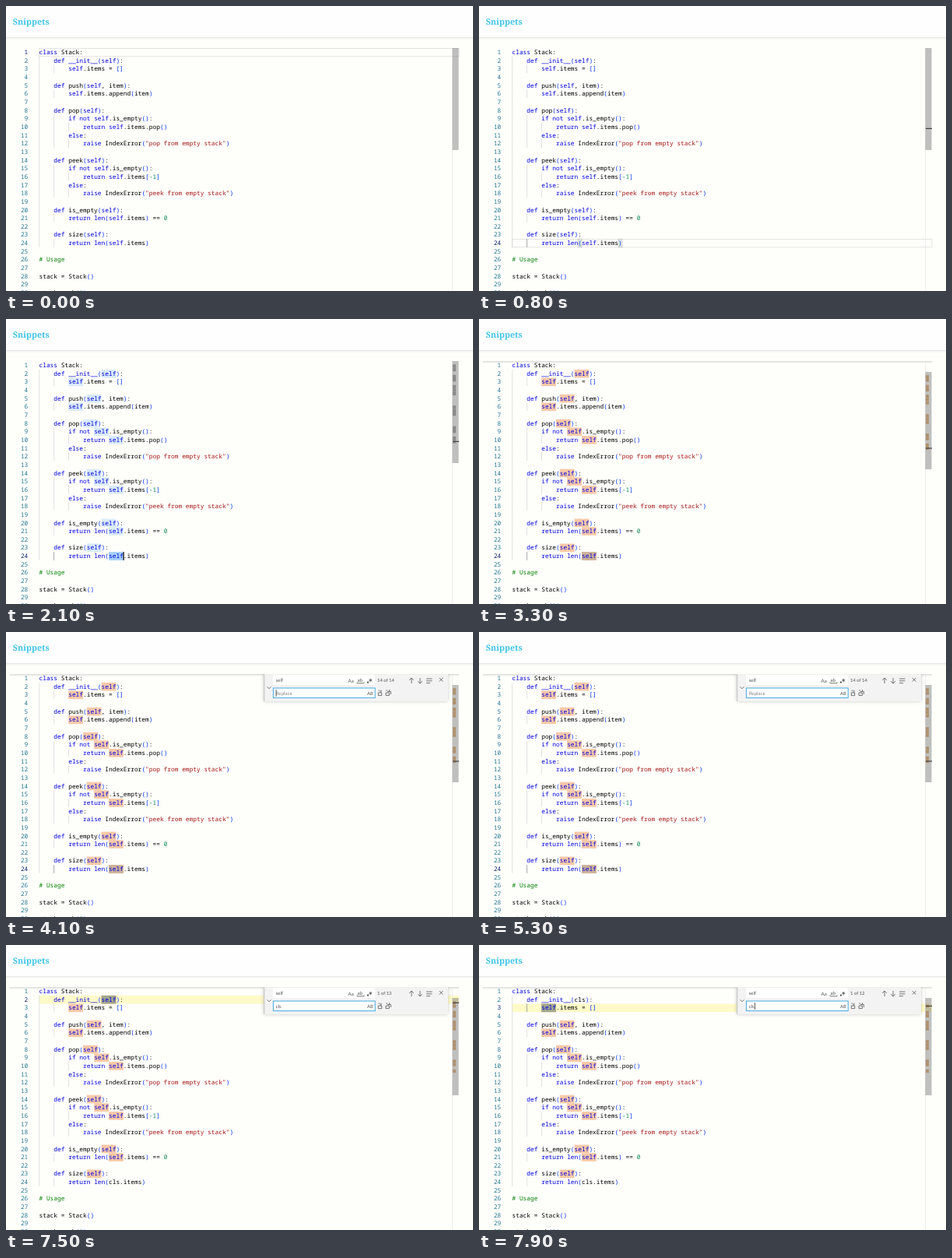
These frames come from a looping animation (600 px wide and 366 px high, 8 s). An HTML page:

```html
<!DOCTYPE html>
<html lang="en">
<head>
<meta charset="utf-8">
<title>Snippets</title>
<style>
  html, body { margin: 0; width: 100%; height: 100%; overflow: hidden; background: #fefefb; }
  svg { display: block; width: 600px; height: 366px; }
  text { white-space: pre; text-rendering: geometricPrecision; }
  .code { font: 7.85px "Noto Sans Mono", monospace; }
  .ui { font: 6.2px Lato, sans-serif; fill: #555; }
  .title { font: bold 10.8px "Noto Serif", serif; fill: #40c4e8; }
  .icon { fill: none; stroke: #555; stroke-width: .8; }
</style>
</head>
<body>
<svg id="stage" viewBox="0 0 600 366"></svg>
<script>
const LOOP = 8000;
const LEFT = 42.5, RIGHT = 582, TOP = 54.2, CW = 4.71, LH = 10.65;
const stage = document.getElementById('stage');

const CODE = `class Stack:
    def __init__(self):
        self.items = []

    def push(self, item):
        self.items.append(item)

    def pop(self):
        if not self.is_empty():
            return self.items.pop()
        else:
            raise IndexError("pop from empty stack")

    def peek(self):
        if not self.is_empty():
            return self.items[-1]
        else:
            raise IndexError("peek from empty stack")

    def is_empty(self):
        return len(self.items) == 0

    def size(self):
        return len(self.items)

# Usage

stack = Stack()

stack.push(1)`.split('\n');

const TOKEN = /(#.*)|("[^"]*")|(\b(?:class|def|if|not|return|else|raise|self|len|__init__)\b)|(-?\b\d+)|([()[\]])|[\w.:,]+|=+/g;
const COLORS = ['#008000', '#a31515', '#0000e0', '#098658', '#0431fa'];

const colX = c => LEFT + c * CW;
const lineY = n => TOP + (n - 1) * LH;
const rect = (x, y, w, h, fill, extra = '') =>
  `<rect x="${x}" y="${y}" width="${w}" height="${h}" fill="${fill}" ${extra}/>`;
const text = (x, y, s, cls, extra = '') =>
  `<text x="${x}" y="${y}" class="${cls}" ${extra}>${s}</text>`;
const icon = (d, extra = '') => `<path class="icon" d="${d}" ${extra}/>`;
const cells = (n, col, len, fill, extra) => rect(colX(col), lineY(n), len * CW, LH, fill, extra);

function stateAt(t) {
  const s = { t, find: t >= 3300, done: [], line: t < 100 ? 1 : 24, caret: null, word: null };
  if (t >= 7000) { s.done.push(24); s.line = 2; }
  if (t >= 7900) { s.done.push(2); s.line = 3; }
  s.selected = t >= 1800;
  s.border = !s.selected;
  s.brackets = t >= 300 && t < 1800;
  if (t >= 200 && t < 800) s.caret = 30;
  else if (t >= 1100 && t < 1500) s.caret = 29;
  else if (t >= 1800 && t < 2400 || t >= 2900 && t < 3300) s.caret = 23;
  if (t >= 1300 && t < 1800) s.word = 'items';
  else if (t >= 2000) s.word = 'self';
  s.lines = CODE.map((l, i) => s.done.includes(i + 1) ? l.replace('self', 'cls') : l);
  return s;
}

function highlights(s) {
  let out = '';
  if (s.border) out += rect(LEFT, lineY(s.line) + .3, RIGHT - LEFT, LH - .4, 'none', 'stroke="#e2e2e0" stroke-width=".9"');
  if (s.done.length) out += rect(LEFT, lineY(s.line), RIGHT - LEFT, LH, '#fffac8');
  if (s.brackets) {
    for (const c of [18, 29]) out += cells(24, c, 1, '#e5efe3', 'stroke="#b9b9b9" stroke-width=".7"');
  }
  if (s.word) {
    const re = new RegExp(`\\b${s.word}\\b`);
    const fill = s.find ? '#f8c9a8' : s.word === 'items' ? '#d2d2cf' : '#d9ebfa';
    s.lines.forEach((l, i) => {
      const col = l.search(re);
      if (col >= 0) out += cells(i + 1, col, s.word.length, fill);
    });
  }
  if (s.selected) {
    const fill = !s.find ? '#a5d0fa' : s.done.length ? '#a3a68c' : '#cbb198';
    out += cells(s.line, s.lines[s.line - 1].indexOf('self'), 4, fill);
  }
  return out;
}

function guides(s) {
  let out = '';
  for (let n = 2; n <= 24; n++) {
    const l = s.lines[n - 1];
    const depth = l ? l.search(/\S/) / 4 : 1;
    for (let k = 0; k < depth; k++) {
      const active = n === s.line && k === 1;
      out += rect(colX(k * 4), lineY(n), .75, LH, active ? '#8c8c8c' : '#d6d6d6');
    }
  }
  return out;
}

function source(s) {
  return s.lines.map((l, i) => {
    const y = (lineY(i + 1) + 7.95).toFixed(2);
    const num = text(28.3, y, i + 1, 'code', `text-anchor="end" fill="${i + 1 === s.line ? '#0b216f' : '#237893'}"`);
    const spans = [...l.matchAll(TOKEN)].map(m => {
      const kind = m.slice(1).findIndex(Boolean);
      return `<tspan x="${colX(m.index).toFixed(2)}" fill="${COLORS[kind] || '#000'}">${m[0]}</tspan>`;
    });
    return num + text(LEFT, y, spans.join(''), 'code');
  }).join('');
}

function ruler(s) {
  const top = s.find ? 68 : 54, step = s.find ? 4.17 : 4.4;
  let out = rect(573, 54, .7, 312, '#e6e6e4');
  if (s.word) {
    const re = new RegExp(`\\b${s.word}\\b`);
    s.lines.forEach((l, i) => {
      if (re.test(l)) out += rect(574, top + i * step, 4, step, s.find ? '#e4b078' : '#a5a5a5');
    });
  }
  out += rect(573.5, top, 8, s.find ? 125 : 131, '#646464', 'fill-opacity=".41"');
  if (s.line > 1) out += rect(574, top + (s.line - .5) * step - .6, 8, 1.2, '#444');
  return out;
}

function inputText(t) {
  const typed = t < 6500 ? '' : 'cls'.slice(0, t < 6600 ? 1 : t < 6700 ? 2 : 3);
  const blink = t < 6500 ? t >= 4100 && (t - 4100) % 800 < 400 : t < 7500 || t >= 7900;
  const x = 346.7 + [0, 3, 4.6, 7.3][typed.length];
  return (typed ? text(346.7, 80.6, typed, 'ui') : text(346.7, 80.6, 'Replace', 'ui', 'style="fill:#858585"'))
    + (blink ? rect(x, 74, .7, 9, '#222') : '');
}

function findBox(s) {
  const p = Math.min(1, (s.t - 3300) / 230);
  const count = ['14 of 14', '1 of 13', '1 of 12'][s.done.length];
  return `<g clip-path="url(#pane)"><g transform="translate(0 ${(-40 * (1 - p)).toFixed(2)})">`
    + rect(331, 50, 237, 39, '#f3f3f3', 'rx="2" filter="url(#soft)"')
    + rect(331, 54, 1.4, 35, '#cdcdcd')
    + rect(343, 55, 131, 13, '#fff')
    + text(346.7, 63.6, 'self', 'ui')
    + text(439.5, 64.5, 'Aa', 'ui')
    + text(451.5, 64, 'ab', 'ui') + icon('M451 64.5v1.3h9v-1.3')
    + rect(464, 63.6, 1.9, 1.9, '#444')
    + icon('M468.3 59.8v4.4M466.4 60.9l3.8 2.2M470.2 60.9l-3.8 2.2')
    + text(477, 64.2, count, 'ui', 'style="font-size:5.9px"')
    + icon('M521 66v-7M518.2 61.8l2.8-2.8 2.8 2.8')
    + icon('M532 59v7M529.2 63.2l2.8 2.8 2.8-2.8')
    + icon('M540 60h7.5M540 62.8h7.5M540 65.6h5')
    + icon('M556.8 59l4.6 4.6M561.4 59l-4.6 4.6')
    + icon('M335.5 70.3l2.5 2.5 2.5-2.5')
    + rect(343.4, 72, 130.8, 12.6, '#fff', 'stroke="#45a9e0" stroke-width="1"')
    + inputText(s.t)
    + text(464, 80.5, 'AB', 'ui', 'style="font-size:5.8px"')
    + icon('M478.3 78v3.6h4.4v-3.6zM478.5 75.2h2M482 74.5v2.6h-1.6', 'stroke-width="1"')
    + icon('M488 78v3.4h4.4v-3.4zM490 76.5h4.4v3.4M488.2 75h2M492.5 74.2v2')
    + '</g></g>';
}

const DEFS = `<defs>
  <clipPath id="pane"><rect x="0" y="54.2" width="600" height="312"/></clipPath>
  <filter id="soft" x="-5%" y="-20%" width="110%" height="150%">
    <feDropShadow dx="0" dy="0" stdDeviation="2" flood-color="#000" flood-opacity=".22"/>
  </filter>
  <linearGradient id="fade" x2="0" y2="1">
    <stop stop-color="#d9d9d9"/><stop offset="1" stop-color="#d9d9d9" stop-opacity="0"/>
  </linearGradient>
</defs>`;

const HEADER = rect(0, 0, 600, 40, '#fefefe') + rect(0, 40, 600, 1.2, '#e7e7e7')
  + rect(0, 41.2, 600, 1.5, '#f6f6f4') + text(8.7, 23.6, 'Snippets', 'title');

let shown = '';
function draw(t) {
  const s = stateAt(t);
  let out = DEFS + HEADER + highlights(s) + guides(s) + source(s);
  if (s.caret !== null) out += rect(colX(s.caret) - .4, lineY(24), 1.3, LH, '#111');
  out += ruler(s);
  if (s.find) out += rect(5, 54, 577, 3, 'url(#fade)') + findBox(s);
  if (out !== shown) stage.innerHTML = shown = out;
}

const start = performance.now();
function tick() {
  draw((performance.now() - start) % LOOP);
  requestAnimationFrame(tick);
}
tick();
</script>
</body>
</html>
```
